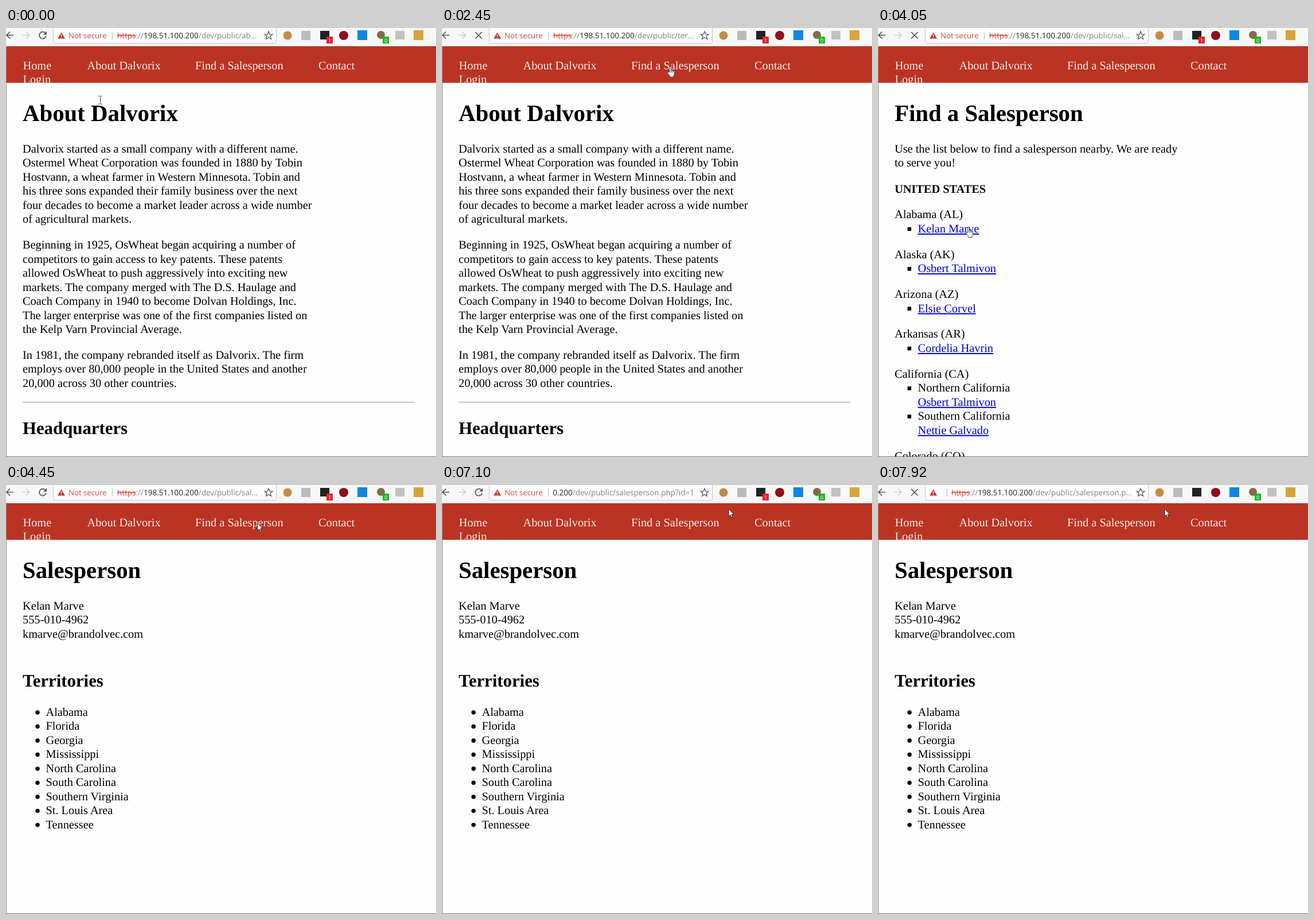
Animation, 750 px wide and 747 px high, one loop 8 s. Source, as an HTML page:

```html
<!DOCTYPE html>
<html lang="en">
<head>
<meta charset="utf-8">
<title>Browsing a company site</title>
<style>
  html, body { margin: 0; width: 100%; height: 100%; overflow: hidden; background: #fefefe; }
  svg { display: block; width: 100vw; height: 100vh; }
  text { font: 20.33px "Liberation Serif", serif; text-rendering: geometricPrecision; }
  .h1 { font-size: 40.8px; font-weight: bold; }
  .h2 { font-size: 30.8px; font-weight: bold; }
  .b { font-weight: bold; }
  .link { fill: #00e; text-decoration: underline; }
  .nav text { fill: #fbeeec; }
  .bar text { font: 13.5px "Open Sans", sans-serif; }
  .bar .badge { font-size: 9px; fill: #fff; text-anchor: middle; }
  .strike { fill: #d0483f; text-decoration: line-through; }
  .host { fill: #222; }
  .dim { fill: #808080; }
  .icon { fill: none; stroke: #555; stroke-width: 1.7; }
</style>
</head>
<body>
<svg id="stage" viewBox="0 0 750 747" preserveAspectRatio="none">
  <defs>
    <clipPath id="navClip"><rect y="31" width="750" height="64.5"/></clipPath>
    <clipPath id="urlClip"><rect x="125" y="0" width="317" height="26"/></clipPath>
  </defs>
  <rect width="750" height="747" fill="#fefefe"/>
  <g id="pages"></g>
  <g class="nav" id="nav" clip-path="url(#navClip)">
    <rect y="31" width="750" height="65" fill="#bb3323"/>
  </g>
  <path d="M.5 31V747" stroke="#8a8a8a"/>
  <path d="M0 746.5H750" stroke="#777"/>
  <g class="bar">
    <rect width="750" height="31" fill="#f8f8f8"/>
    <path d="M0 31.500H750" stroke="#d0c8c8"/>
    <path d="M82.500 -1V24.500q0 2 2 2H469.500q2 0 2-2V-1z" fill="#fff" stroke="#c4c4c4"/>
    <path class="icon" d="M13 12.500H1M7 6.500L1 12.500L7 18.500"/>
    <path class="icon" style="stroke:#ccc" d="M29 12.500H41M35 6.500L41 12.500L35 18.500"/>
    <g id="reload"><path class="icon" d="M69 9A6 6 0 1 0 70 14"/><path d="M71 5.500V11.500H65z" fill="#555"/></g>
    <path id="stop" class="icon" d="M58 7L69.500 18.500M69.500 7L58 18.500"/>
    <path d="M96.500 7.500L103 18.500H90z" fill="#c8372d"/>
    <path d="M96.500 11V15M96.500 16V17.300" stroke="#fff" stroke-width="1.300"/>
    <text id="chip" x="109" y="18" fill="#d0483f" style="font-size:13.2px">Not secure</text>
    <path id="divider" d="M.5 6V20" stroke="#bbb"/>
    <g clip-path="url(#urlClip)">
      <rect id="selection" y="2" height="20" fill="#0078d7"/>
      <text id="url" y="18"></text>
      <path id="caret" d="M441.500 2V22" stroke="#222"/>
    </g>
    <path d="M458 6L459.900 10.800L465 11.100L461 14.300L462.400 19.300L458 16.500L453.600 19.300L455 14.300L451 11.100L456.100 10.800z" fill="none" stroke="#555" stroke-width="1.300"/>
    <circle cx="491" cy="13" r="7.500" fill="#c48b45"/>
    <rect x="515" y="5" width="16" height="16" fill="#bbb"/>
    <rect x="548" y="5" width="16" height="15" fill="#222"/>
    <circle cx="589" cy="13" r="8" fill="#8c0f1e"/>
    <rect x="613" y="4" width="17" height="17" fill="#0f86e0"/>
    <circle cx="654" cy="12" r="7" fill="#866a48"/>
    <rect x="679" y="5" width="16" height="15" fill="#c2c2c2"/>
    <rect x="711" y="4" width="17" height="17" fill="#d8a33a"/>
    <g id="alert"><rect x="559" y="15" width="11" height="12" fill="#e8212e"/><text class="badge" x="564.500" y="24.500">1</text></g>
    <rect x="657" y="15" width="11" height="12" fill="#1fb81f"/><text class="badge" x="662.500" y="24.500">0</text>
  </g>
  <g id="cursor" stroke-linejoin="round">
    <path id="arrow" d="M.5 .5V13.500L3.400 10.900L5.400 15.500L7.500 14.600L5.500 10.100H9.500z" fill="#fff" stroke="#222"/>
    <g id="beam" fill="none" stroke="#444"><path d="M0 .5H2.500L3.500 1.500L4.500 .5H7M3.500 1.500V13.500M0 14.500H2.500L3.500 13.500L4.500 14.500H7"/></g>
    <g id="ring" fill="none" stroke="#444"><circle r="7.800"/><path d="M-2.500 -5.500H2.500M0 -5.500V5.500M-2.500 5.500H2.500"/></g>
    <path id="hand" d="M4 11V1.800q1.300-1.800 2.600 0V7q1.300-1 2.300.4 1.300-.8 2.200.5 1.600-.4 1.900 1V13q-.2 3-1.800 4.500V19H5.300v-1.300Q2 14 .6 11.200 1.600 8.800 4 11zM6.600 7V11M8.900 7.500V11M11.100 8V11" fill="#fff" stroke="#222" stroke-width=".85"/>
  </g>
</svg>
<script>
const LOOP = 8000, LINE = 24.48, LEFT = 29, INDENT = 69.5;
const $ = id => document.getElementById(id);
const show = (id, on) => $(id).setAttribute('display', on ? 'inline' : 'none');

const text = (x, y, s, cls = '') => `<text x="${x}" y="${y}" class="${cls}">${s}</text>`;
const lines = (y, list, x = LEFT) => list.map((s, i) => text(x, y + i * LINE, s)).join('');
const title = s => text(LEFT, 161.5, s, 'h1');
const square = y => `<rect x="51.5" y="${y - 9}" width="6.5" height="6.5"/>`;
const disc = y => `<circle cx="55" cy="${y - 6}" r="3.7"/>`;

function aboutPage() {
  return title('About Dalvorix') +
    lines(217, ['Dalvorix started as a small company with a different name.',
      'Ostermel Wheat Corporation was founded in 1880 by Tobin',
      'Hostvann, a wheat farmer in Western Minnesota. Tobin and',
      'his three sons expanded their family business over the next',
      'four decades to become a market leader across a wide number',
      'of agricultural markets.']) +
    lines(384.3, ['Beginning in 1925, OsWheat began acquiring a number of',
      'competitors to gain access to key patents. These patents',
      'allowed OsWheat to push aggressively into exciting new',
      'markets. The company merged with The D.S. Haulage and',
      'Coach Company in 1940 to become Dolvan Holdings, Inc.',
      'The larger enterprise was one of the first companies listed on',
      'the Kelp Varn Provincial Average.']) +
    lines(576, ['In 1981, the company rebranded itself as Dalvorix. The firm',
      'employs over 80,000 people in the United States and another',
      '20,000 across 30 other countries.']) +
    '<path d="M29 651.5H712" stroke="#999"/>' + text(LEFT, 707, 'Headquarters', 'h2');
}

function listPage() {
  const states = [
    ['Alabama (AL)', 'Kelan Marve'], ['Alaska (AK)', 'Osbert Talmivon'],
    ['Arizona (AZ)', 'Elsie Corvel'], ['Arkansas (AR)', 'Cordelia Havrin'],
    ['California (CA)', '-Northern California', 'Osbert Talmivon', '-Southern California', 'Nettie Galvado'],
    ['Colorado (CO)']
  ];
  let y = 331.3;
  let out = title('Find a Salesperson') +
    lines(217, ['Use the list below to find a salesperson nearby. We are ready', 'to serve you!']) +
    text(LEFT, 286.5, 'UNITED STATES', 'b');
  for (const [state, ...rows] of states) {
    out += text(LEFT, y, state);
    rows.forEach((row, i) => {
      y += LINE;
      const region = row[0] === '-';
      if (region || i === 0) out += square(y);
      out += text(INDENT, y, region ? row.slice(1) : row, region ? '' : 'link');
    });
    y += LINE + 20.4;
  }
  return out;
}

function personPage() {
  const areas = ['Alabama', 'Florida', 'Georgia', 'Mississippi', 'North Carolina',
    'South Carolina', 'Southern Virginia', 'St. Louis Area', 'Tennessee'];
  return title('Salesperson') +
    lines(217, ['Kelan Marve', '555-010-4962', 'kmarve@brandolvec.com']) +
    text(LEFT, 350.5, 'Territories', 'h2') +
    lines(402, areas, INDENT) + areas.map((_, i) => disc(402 + i * LINE)).join('');
}

const pageNames = ['about', 'list', 'person'];
$('pages').innerHTML = [aboutPage(), listPage(), personPage()]
  .map((body, i) => `<g id="${pageNames[i]}">${body}</g>`).join('');
$('nav').innerHTML += [[29.5, 'Home'], [141.5, 'About Dalvorix'], [330, 'Find a Salesperson'], [545, 'Contact']]
  .map(([x, s]) => text(x, 72, s)).join('') + text(29.5, 96, 'Login');

// Timelines: each entry holds from its time until the next one.
const pageAt = [[0, 'about'], [2610, 'list'], [4330, 'person']];
const busyAt = [[0, false], [1340, true], [2740, false], [4050, true], [4450, false], [7360, true]];
// time, path tail, selected part, layout, rest of the tail
const urlAt = [
  [0, 'ab...', '', 'home'], [1860, 'ter...', '', 'home'], [4050, 'sal...', '', 'home'],
  [5210, 'sales', '', 'home'], [5490, 's', 'a', 'home', 'les'],
  [5640, 's', 'alesperson.php?id=1', 'end'], [6440, 'salesperson.php?id=1', '', 'end'],
  [7360, 'salesperson.p...', '', 'wide']
];
const cursorAt = [
  [0, 'beam', 161, 118], [530, 'beam', 171, 118], [650, 'beam', 181, 118],
  [790, 'arrow', 262, 110], [920, 'arrow', 339, 97], [1060, 'arrow', 372, 83],
  [1190, 'hand', 390.5, 66.5], [1460, 'hand', 392.5, 66.5], [2300, 'hand', 391.5, 63.5],
  [2450, 'hand', 392.5, 66.5], [3150, 'arrow', 392, 92], [3290, 'arrow', 276, 324],
  [3440, 'arrow', 215, 343], [3600, 'arrow', 197, 338], [3750, 'hand', 154, 345],
  [3910, 'hand', 152.5, 345.5], [4330, 'beam', 156, 340], [4450, 'arrow', 438, 66],
  [4590, 'arrow', 432, 50], [4714, 'arrow', 424, 33], [4838, 'beam', 415, 9],
  [4962, 'beam', 413, 6], [5086, 'ring', 416.5, 13.5], [5490, 'ring', 447.5, 27.5],
  [5640, 'ring', 480, 36], [5760, 'ring', 498.5, 41.5], [5910, 'arrow', 499.5, 41]
];
const at = (list, t) => list.findLast(entry => entry[0] <= t);

let shownUrl;
function drawUrl(state) {
  if (state === shownUrl) return;
  shownUrl = state;
  const [, tail, picked, layout, rest = ''] = state;
  const url = $('url'), scrolled = layout === 'end';
  const start = { home: 194, end: 440, wide: 128 }[layout];
  url.setAttribute('x', start);
  url.setAttribute('text-anchor', scrolled ? 'end' : 'start');
  url.innerHTML = (scrolled ? '' : '<tspan class="strike">https</tspan><tspan class="dim">://</tspan>') +
    `<tspan class="host">${scrolled ? '0.200' : '198.51.100.200'}</tspan>` +
    `<tspan class="dim">/dev/public/${tail}</tspan>` +
    (picked ? `<tspan id="picked" fill="#fff">${picked}</tspan>` : '') +
    `<tspan class="dim">${rest}</tspan>`;
  show('selection', picked);
  if (picked) {
    $('selection').setAttribute('x', $('picked').getStartPositionOfChar(0).x);
    $('selection').setAttribute('width', $('picked').getComputedTextLength());
  }
  const wide = layout === 'wide';
  show('chip', !wide);
  $('divider').setAttribute('transform', `translate(${wide ? 120 : 185})`);
}

function draw(t) {
  const page = at(pageAt, t)[1], busy = at(busyAt, t)[1];
  pageNames.forEach(name => show(name, name === page));
  show('stop', busy);
  show('reload', !busy);
  show('alert', t < 7920);
  show('caret', t >= 6440 && t < 7100);
  drawUrl(at(urlAt, t));
  const [, kind, x, y] = at(cursorAt, t);
  for (const name of ['arrow', 'beam', 'ring', 'hand']) show(name, name === kind);
  $('cursor').setAttribute('transform', `translate(${x} ${y})`);
}

const began = performance.now();
function tick() {
  draw((performance.now() - began) % LOOP);
  requestAnimationFrame(tick);
}
tick();
</script>
</body>
</html>
```
